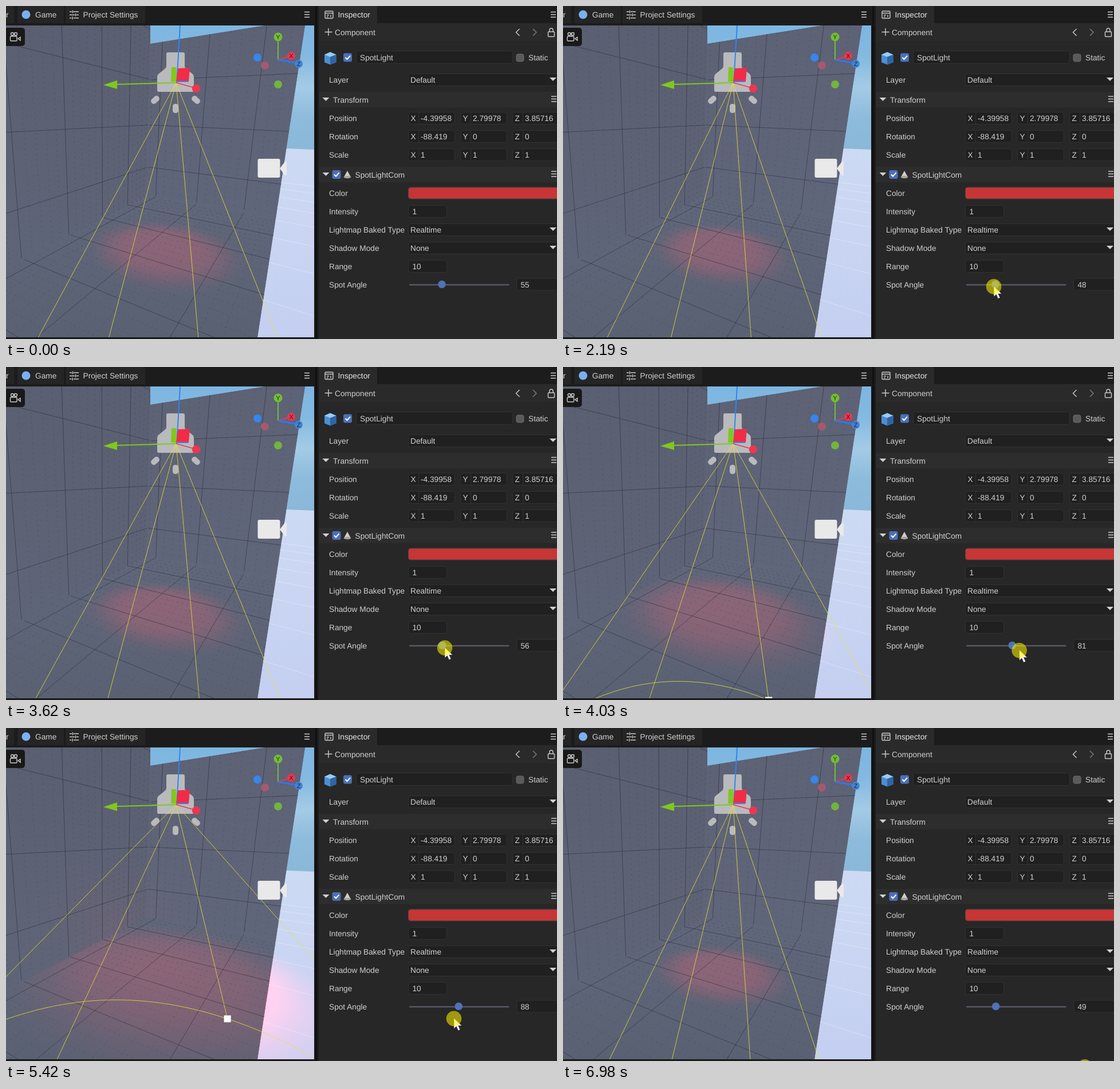
Animation of 962x582 px, one loop 7.05 s. Source, as an HTML page with a canvas:

```html
<!DOCTYPE html>
<html lang="en">
<head>
<meta charset="utf-8">
<title>Spot angle</title>
<style>
  html, body { margin: 0; width: 100%; height: 100%; overflow: hidden; background: #1b1b1b; }
  #stage { position: relative; width: 962px; height: 582px; overflow: hidden; }
  canvas, svg { position: absolute; left: 0; top: 0; display: block; }
  text { font: 13.7px "Liberation Sans", Arial, sans-serif; fill: #d0d0d0; text-rendering: geometricPrecision; }
  .bold { font-weight: 500; fill: #e6e6e6; }
  .field { fill: #202020; stroke: #323232; }
  .ink { fill: none; stroke: #cccccc; stroke-width: 1.4; }
  .ray { fill: none; stroke: #efe030; stroke-width: .8; }
</style>
</head>
<body>
<div id="stage">
<canvas id="room" width="538" height="579"></canvas>
<svg width="962" height="582" viewBox="0 0 962 582">
  <defs>
    <clipPath id="view"><rect y="34" width="538" height="545"/></clipPath>
    <g id="menu"><path class="ink" d="M0 0h9M0 4.5h9M0 9h9"/></g>
    <path id="down" d="M0 0h12l-6 6z" fill="#cfcfcf"/>
    <g id="tick"><rect width="15" height="15" rx="3" fill="#4a70b8"/><path d="M3.5 7.5l3 3 5.5-6" fill="none" stroke="#fff" stroke-width="2"/></g>
  </defs>

  <!-- scene icons and gizmos -->
  <g clip-path="url(#view)">
    <g fill="#b9babd">
      <path d="M283 81h26q3 0 3 3v21q0 3 3 5l11 9q2 2 2 5v23q0 3-3 3h-58q-3 0-3-3v-23q0-3 2-5l11-9q3-2 3-5v-21q0-3 3-3z"/>
      <rect x="-8" y="-5" width="16" height="10" rx="4.5" transform="translate(260.5 164) rotate(-42)"/>
      <rect x="-8" y="-5" width="16" height="10" rx="4.5" transform="translate(331.5 164) rotate(42)"/>
      <rect x="291" y="171" width="10" height="16" rx="4.5"/>
    </g>
    <path id="rays" class="ray"/>
    <path id="ring" class="ray"/>
    <rect id="grip" width="12" height="12" fill="#fff"/>
    <path d="M304 34L298 134" stroke="#2f86f0" stroke-width="2"/>
    <path d="M297 134L192 137" stroke="#7fc81e" stroke-width="2"/>
    <path d="M170 138l24-8v15z" fill="#7fc81e"/>
    <path d="M297 134l36 10" stroke="#ee3650" stroke-width="1.5"/>
    <path d="M289 107h8l1 25h-10z" fill="#7fc81e"/>
    <path d="M300 109l21-1-2 24h-22z" fill="#f02c48"/>
    <path d="M297 132h21" stroke="#2f86f0" stroke-width="2"/>
    <circle cx="332" cy="144" r="7.2" fill="#ee3650"/>
    <rect x="439.5" y="267" width="39" height="33" rx="3" fill="#e9e9e9"/>
    <path d="M478 284l9-12q3-1 3 2v20q0 3-3 2z" fill="#e9e9e9"/>
    <g stroke-width="2">
      <path d="M475 94V60" stroke="#74bd35"/>
      <path d="M475 94l20-6" stroke="#ee3650"/>
      <path d="M475 94l34 6" stroke="#2f78e8" stroke-width="3"/>
    </g>
    <circle cx="475" cy="54" r="7.5" fill="#74bd35"/>
    <circle cx="498" cy="87" r="7" fill="#ee3650"/>
    <circle cx="511" cy="101" r="7" fill="#4383d2"/>
    <circle cx="439" cy="90" r="7" fill="#3586ee"/>
    <circle cx="452" cy="104" r="7" fill="#a5596e"/>
    <circle cx="475" cy="137" r="7" fill="#72b43e"/>
    <g text-anchor="middle">
      <text x="475" y="58" style="font-size:11px;fill:#20380c">Y</text>
      <text x="498" y="91" style="font-size:11px;fill:#4a0a16">X</text>
      <text x="511" y="105" style="font-size:11px;fill:#122b58">Z</text>
    </g>
    <rect x="-3" y="38" width="36" height="32" rx="5" fill="#191919"/>
    <g class="ink"><circle cx="11" cy="49" r="2.5"/><circle cx="17" cy="49" r="2.5"/><rect x="7.5" y="53" width="11.5" height="8" rx="1.5"/><path d="M21 57l4-2.5v5.5z"/></g>
  </g>

  <!-- left tab bar -->
  <rect width="546" height="34" fill="#1c1c1c"/>
  <path d="M0 0h14v30H0zM20 0h79q2 0 2 2v28H20zM104 0h137q2 0 2 2v28H104z" fill="#252525"/>
  <circle cx="35" cy="15" r="7.5" fill="#79b0f2"/>
  <g class="ink"><path d="M111 10h4m3 0h9M111 15.5h9m3 0h4M111 21h3m4 0h9"/><path d="M116.5 7.5v5M121.500 13v5M116 18.500v5"/></g>
  <use href="#menu" x="521" y="10.5"/>
  <path d="M0 579h546v3H0zM538 34h8v548h-8z" fill="#1a1a1a"/>

  <!-- inspector -->
  <rect x="546" width="416" height="582" fill="#272727"/>
  <rect x="546" width="416" height="30" fill="#1c1c1c"/>
  <path d="M546 0h100q2 0 2 2v28H546z" fill="#2a2a2a"/>
  <rect x="546" y="30" width="416" height="31" fill="#2a2a2a"/>
  <path d="M546 150h416v27H546zM546 281h416v27H546z" fill="#2d2d2d"/>
  <path d="M541.5 0v582" stroke="#111" stroke-width="3"/>
  <g class="ink"><rect x="557" y="9" width="14" height="12.5" rx="1.5"/><path d="M557 12.5h14M560 16h4M560 19h2.5M567 15.5v4"/></g>
  <path class="ink" d="M556.5 45.5h13M563 39v13M896.500 40l-6 6 6 6"/>
  <path d="M920 40l6 6-6 6" fill="none" stroke="#777" stroke-width="1.6"/>
  <g class="ink"><rect x="946.5" y="45" width="11" height="8.5" rx="1"/><path d="M949 45v-3q0-3 3-3t3 3v3"/></g>
  <use href="#menu" x="951" y="10.5"/><use href="#menu" x="952" y="158"/><use href="#menu" x="952" y="289"/>
  <path d="M566 80.5l10.5 4.5v13.5l-10.5 4-10-4V85z" fill="#4b8fd0"/>
  <path d="M566 80.5l10.5 4.500-10.500 4-10-4z" fill="#9acbf0"/>
  <path d="M566 89l10.5-4v13.500l-10.500 4z" fill="#2f65a5"/>
  <use href="#tick" x="589" y="82.5"/><use href="#tick" x="569.5" y="287"/>
  <rect x="891" y="84" width="13" height="13" rx="3" fill="#5a5a5a" stroke="#6a6a6a"/>
  <use href="#down" x="552.5" y="160"/><use href="#down" x="552.5" y="291"/>
  <path d="M596 288l5.5 10q-5.500 3.500-11 0z" fill="#cfcfc8"/><ellipse cx="596" cy="299" rx="6.5" ry="2.2" fill="#a4a49c"/>
  <g id="fields"></g>
  <rect x="702.5" y="317" width="270" height="20" rx="4" fill="#c73535" stroke="#454545"/>
  <rect x="704" y="486" width="174.5" height="2.4" rx="1" fill="#555864"/>
  <circle id="knob" cy="486.5" r="6.8" fill="#4f72b8"/>
  <g id="labels"></g>
  <text id="value" x="898.5" y="491.5"></text>

  <g id="pointer">
    <path d="M0 0v18.5l4.300-3.900 3.200 7.200 3.500-1.500-3.200-7h6z" fill="#fff" stroke="#222" stroke-width=".6"/>
    <circle id="press" cy=".8" r="13.3" fill="#fff000" fill-opacity=".56"/>
  </g>
</svg>
</div>

<script>
const LOOP = 7050;
const $ = id => document.getElementById(id);
const SVG = 'http://www.w3.org/2000/svg';

function add(parent, tag, attrs, text) {
  const el = document.createElementNS(SVG, tag);
  for (const k in attrs) el.setAttribute(k, attrs[k]);
  if (text) el.textContent = text;
  $(parent).append(el);
}
const label = (x, y, s, cls = '') => add('labels', 'text', { x, y: y + 5, class: cls }, s);
const field = (x, y, width, height = 21) =>
  add('fields', 'rect', { x: x + .5, y: y - height / 2, width, height, rx: 4, class: 'field' });

function buildPanel() {
  label(0, 15, 'r'); label(51, 15, 'Game'); label(134.5, 15, 'Project Settings');
  label(579.5, 15, 'Inspector', 'bold'); label(574, 45.5, 'Component');
  field(611, 89.5, 273, 22); label(618, 89.5, 'SpotLight'); label(912, 90, 'Static');
  label(571, 164, 'Transform'); label(609.5, 295, 'SpotLightCom');
  const rows = ['Color', 'Intensity', 'Lightmap Baked Type', 'Shadow Mode', 'Range', 'Spot Angle'];
  rows.forEach((s, i) => label(564, 327 + i * 31.9, s));
  label(564, 129, 'Layer');
  [[129, 'Default'], [391, 'Realtime'], [423, 'None']].forEach(([y, s]) => {
    field(702, y, 270);
    label(706, y, s);
    add('fields', 'use', { href: '#down', x: 949, y: y - 4 });
  });
  const vectors = { Position: ['-4.39958', '2.79978', '3.85716'], Rotation: ['-88.419', '0', '0'], Scale: ['1', '1', '1'] };
  Object.entries(vectors).forEach(([name, values], r) => {
    const y = 196 + r * 32;
    label(564, y, name);
    values.forEach((v, c) => {
      const x = 702 + c * 91;
      field(x, y, c < 2 ? 81 : 90);
      add('fields', 'path', { d: `M${x + 18.5} ${y - 10}v20`, stroke: '#323232' });
      label(x + 4.5, y, 'XYZ'[c]);
      label(x + 22, y, v);
    });
  });
  [[359, '1'], [455, '10']].forEach(([y, s]) => { field(702, y, 67); label(709.5, y, s); });
  field(891, 486.5, 80);
}

// Piecewise linear tracks: [time, value, ...]
const ANGLE = [[1640, 55], [2000, 53], [2320, 45], [2380, 42], [2600, 26], [2740, 20], [2810, 19],
  [2950, 20], [3080, 32], [3210, 35], [3400, 46], [3550, 56], [3620, 56], [3900, 65], [3970, 70],
  [4200, 112], [4330, 132], [4450, 129.5], [4520, 128], [4660, 120], [5000, 112], [5350, 92.4],
  [5420, 88], [5490, 82], [5800, 53], [5970, 49]];
const POINTER = [[180, 866, 600], [190, 858, 570], [500, 660, 427], [700, 700, 482], [880, 748, 516],
  [1160, 773, 497], [1440, 761, 488], [1640, 761, 488], [2320, 750, 490], [2740, 728, 490],
  [2810, 727, 490], [2950, 727, 491], [3080, 742, 491], [3620, 766, 490], [3900, 775, 493],
  [4250, 833, 497], [4520, 821.5, 497], [4660, 812, 499], [5000, 808, 503], [5350, 788, 507],
  [5420, 782, 507], [5970, 753, 509], [6300, 753, 509], [6510, 890, 600], [6900, 911, 620], [6910, 911, 591.5]];

function at(keys, t) {
  const i = keys.findIndex(k => k[0] > t);
  if (i === 0) return keys[0].slice(1);
  if (i < 0) return keys[keys.length - 1].slice(1);
  const a = keys[i - 1], b = keys[i], f = (t - a[0]) / (b[0] - a[0]);
  return a.slice(1).map((v, j) => v + (b[j + 1] - v) * f);
}

// Room space: x right, z away, h above the floor; one unit is the lamp height.
const APEX = [297, 134], LEFT = -.63, RIGHT = .57, BACK = 1.09, TILE = .424;
function project(x, z, h = 0) {
  const w = Math.max(.0005, .00345 + .001517 * z - .000962 * x - .00046 * h);
  return [APEX[0] + (-.0798 + .056 * h + .3285 * z + .903 * x) / w,
          APEX[1] + (1 - h + .0922 * z - .032 * x) / w];
}

const ctx = $('room').getContext('2d');
const ROOM = [[0, 34], [252, 34], [252, 66], [453, 34], [522, 34], [439, 579], [0, 579]];
const FLOOR = [[245, 330], [472, 365], [439, 579], [0, 579], [0, 460]];
const LEFT_WALL = [[0, 34], [252, 34], [252, 66], [245, 330], [0, 460]];
const BACK_WALL = [[252, 66], [453, 34], [522, 34], [472, 365], [245, 330]];
const GROUND = [[489, 249], [538, 251], [538, 579], [439, 579]];

function trace(points) {
  ctx.beginPath();
  points.forEach(p => ctx.lineTo(...p));
  ctx.closePath();
}
function fill(points, style) { trace(points); ctx.fillStyle = style; ctx.fill(); }
function within(points, draw) {
  ctx.save();
  trace(points);
  ctx.clip();
  draw();
  ctx.restore();
}
function blend(g, colors) {
  colors.forEach((c, i) => g.addColorStop(i / (colors.length - 1), c));
  return g;
}
const shade = (y0, y1, ...colors) => blend(ctx.createLinearGradient(0, y0, 0, y1), colors);
const glow = (x, y, r, ...colors) => blend(ctx.createRadialGradient(x, y, 0, x, y, r), colors);

// Rules a surface: `line(v)` gives both ends of the grid line at v.
function rule(from, to, phase, line, minor = .2) {
  const step = TILE / 5;
  ctx.lineWidth = 1;
  for (let n = Math.ceil((from - phase) / step); phase + n * step <= to; n++) {
    const [a, b] = line(phase + n * step), bold = n % 5 === 0;
    ctx.setLineDash(bold ? [] : [3, 6]);
    ctx.strokeStyle = `rgba(34,36,50,${bold ? .5 : minor})`;
    ctx.beginPath();
    ctx.moveTo(...a);
    ctx.lineTo(...b);
    ctx.stroke();
  }
}

function drawGrid() {
  within(FLOOR, () => {
    rule(-1.5, BACK, -.605, z => [project(LEFT, z), project(RIGHT + .1, z)]);
    rule(LEFT, RIGHT, .319, x => [project(x, -1.5), project(x, BACK)]);
  });
  within(LEFT_WALL, () => {
    rule(-1.1, BACK, -.605, z => [project(LEFT, z), project(LEFT, z, 2.6)]);
    rule(0, 2.4, .2986, h => [project(LEFT, -1.1, h), project(LEFT, BACK, h)], .1);
  });
  within(BACK_WALL, () => {
    rule(LEFT, RIGHT + .1, .319, x => [project(x, BACK), project(x, BACK, 2)]);
    rule(0, 2, .2986, h => [project(LEFT, BACK, h), project(RIGHT + .1, BACK, h)], .1);
  });
  within(GROUND, () => {
    ctx.strokeStyle = 'rgba(255,255,255,.3)';
    ctx.setLineDash([]);
    for (let z = -1.5; z < 3; z += TILE) {
      ctx.beginPath();
      ctx.moveTo(...project(RIGHT - .1, z));
      ctx.lineTo(...project(RIGHT + .5, z));
      ctx.stroke();
    }
  });
}

function disc(r) {
  return Array.from({ length: 72 }, (_, i) => {
    const a = i * Math.PI / 36;
    return project(r * Math.cos(a), r * Math.sin(a));
  });
}

// Stacked floor discs add up to the light's falloff.
function drawPool(k, peak) {
  let level = 0;
  for (let i = 100; i >= 0; i--) {
    const r = k * i / 100, e = Math.min(1, (1 - i / 100) / .55);
    const gain = Math.round(peak * e * e * (3 - 2 * e) / (1 + r * r * 1.3));
    if (gain <= level) continue;
    fill(disc(Math.max(r, .005)), `rgb(${gain - level},0,0)`);
    level = gain;
  }
}

function drawRoom(angle, k) {
  ctx.globalCompositeOperation = 'source-over';
  ctx.fillStyle = shade(34, 250, '#7db6e2', '#84b9e0', '#a3cbe6', '#8dbbdb', '#8ab8d8');
  ctx.fillRect(0, 34, 538, 545);
  fill(GROUND, shade(250, 579, '#cddaf3', '#c4cff1'));
  fill(ROOM, '#5f6578');
  fill(LEFT_WALL, shade(34, 460, '#5a5f71', '#5f6578'));
  fill(BACK_WALL, shade(34, 365, '#5d6275', '#60667a'));
  fill(FLOOR, shade(330, 579, '#61677a', '#596173'));
  ctx.globalCompositeOperation = 'lighter';
  within(FLOOR, () => drawPool(k, 45));
  within(GROUND, () => drawPool(k, 110));
  const spill = Math.max(0, Math.min(1, (angle - 70) / 60));
  if (spill) {
    const tint = glow(190, 350, 190, `rgba(34,2,0,${spill})`, 'rgba(0,0,0,0)');
    fill(LEFT_WALL, tint);
    fill(BACK_WALL, tint);
  }
  ctx.globalCompositeOperation = 'source-over';
  drawGrid();
}

// Cone rim in screen space; `far` marks points that pass behind the eye.
function rim(k, c, s) {
  const dx = (-35.5 + k * (-402 * c + 146.2 * s)) / 445;
  const dy = 1 + k * (.032 * c + .0922 * s);
  const w = .001183 + .0001146 * Math.hypot(1, k) + k * (.000962 * c + .001517 * s);
  const d = Math.max(w, .0004);
  return { x: APEX[0] + dx / d, y: APEX[1] + dy / d, far: w < d };
}

function drawCone(k) {
  const ends = [[1, 0], [0, -1], [0, 1], [-1, 0]].map(([c, s]) => rim(k, c, s));
  $('rays').setAttribute('d', ends.map(p => `M${APEX}L${p.x} ${p.y}`).join(''));
  let d = '', pen = 'M';
  for (let a = -180; a <= 180; a += 3) {
    const p = rim(k, Math.cos(a * Math.PI / 180), Math.sin(a * Math.PI / 180));
    if (p.far) { pen = 'M'; continue; }
    d += `${pen}${p.x.toFixed(1)} ${p.y.toFixed(1)}`;
    pen = 'L';
  }
  $('ring').setAttribute('d', d);
  $('grip').setAttribute('x', ends[2].x - 6);
  $('grip').setAttribute('y', ends[2].y - 6);
}

function render(t) {
  // The scene trails the slider by one update.
  const [angle] = at(ANGLE, t), [lit] = at(ANGLE, t - 70);
  const k = Math.tan(lit * Math.PI / 360);
  drawRoom(lit, k);
  drawCone(k);
  $('knob').setAttribute('cx', 712.05 + .89 * angle);
  $('value').textContent = Math.round(angle);
  $('pointer').setAttribute('transform', `translate(${at(POINTER, t)})`);
  const held = t >= 1640 && t < 6300 || t >= 6910;
  $('press').style.display = held ? '' : 'none';
}

buildPanel();
const start = performance.now();
function tick() {
  render((performance.now() - start) % LOOP);
  requestAnimationFrame(tick);
}
tick();
</script>
</body>
</html>
```
